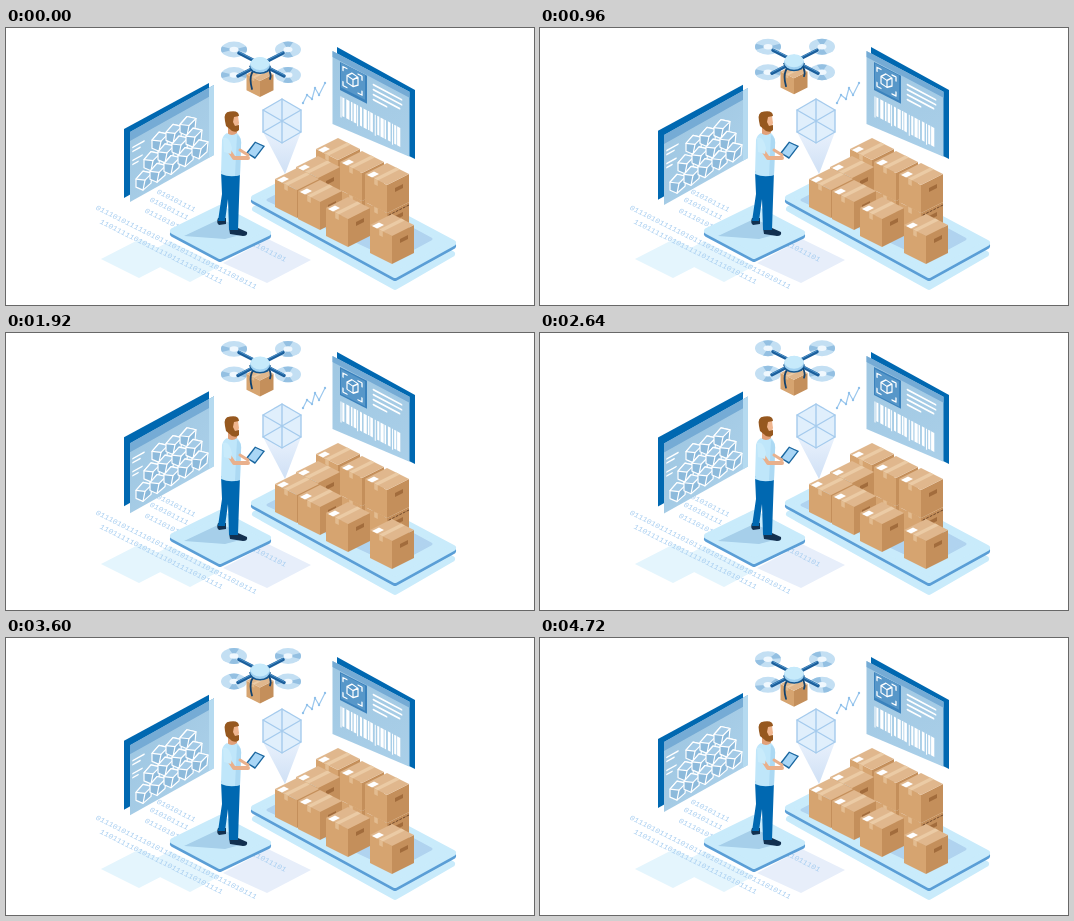
Recreate the animation shown at these times as an HTML page. Size 528 px wide and 277 px high, loop 4800 ms.

```html
<!DOCTYPE html>
<html lang="en">
<head>
<meta charset="utf-8">
<title>Smart warehouse</title>
<style>
html, body { margin: 0; width: 100%; height: 100%; overflow: hidden; background: #fff; }
svg { display: block; width: 528px; height: 277px; }
.code { font: 8px "Liberation Mono", monospace; fill: #a6cdf0; }
</style>
</head>
<body>
<svg viewBox="0 0 528 277" fill="none" stroke-linejoin="round" stroke-linecap="round">
  <defs>
    <linearGradient id="beam" x1="0" y1="0" x2="0" y2="1">
      <stop offset="0" stop-color="#e9f1fc"/><stop offset="1" stop-color="#cfe0f5"/>
    </linearGradient>
    <linearGradient id="glass" x1="0" y1="0" x2="1" y2="1">
      <stop offset="0" stop-color="#9fc7e2"/><stop offset="1" stop-color="#abd0e9"/>
    </linearGradient>
  </defs>

  <!-- ground -->
  <path d="M95 231 134 211 172 230 133 250zM134 229 164 213 214 238 184 254z" fill="#e4f5fd"/>
  <path d="M217 235 262 211 305 232 261 255z" fill="#e7eefa"/>
  <g id="codes" class="code"></g>

  <!-- platforms -->
  <g stroke-width="6">
    <path d="M249 181 306 152 446 226 389 259z" fill="#c9ebfb" stroke="#c9ebfb"/>
    <path d="M248 173 306 144 447 218 389 250z" fill="#5a9ed6" stroke="#5a9ed6"/>
    <path d="M248 170 306 140 447 215 389 247z" fill="#c9ebfb" stroke="#c9ebfb"/>
    <path d="M262 172 308 148 425 211 388 231z" fill="#b0d3ef" stroke="#b0d3ef" stroke-width="3"/>
    <path d="M167 206 214 183 262 208 214 231z" fill="#5a9ed6" stroke="#5a9ed6"/>
    <path d="M167 203 214 180 262 205 214 228z" fill="#c9ebfb" stroke="#c9ebfb"/>
    <path d="M178 208 214 191 224 195 238 206 219 211z" fill="#a6cfea"/>
  </g>

  <!-- left screen -->
  <path id="leftBack" d="M118 101 203 55V122L118 170z" fill="#0068b1"/>
  <g id="leftFront">
    <g transform="matrix(1 -.56 0 1 124 104)">
      <path d="M0 0H84V70H0z" fill="url(#glass)"/>
      <path d="M0 0H84V9H0z" fill="#75abd5"/>
      <path d="M79 0H84V70H79z" fill="#b5daf0"/>
      <path d="M3 17H14M3 21H10M3 30H12M3 34H8" stroke="#fff" stroke-width="1.6"/>
    </g>
    <g id="cells" stroke="#fff" stroke-width="1.2"></g>
  </g>

  <!-- right screen -->
  <path d="M331 19 409 62V131L331 92z" fill="#0068b1"/>
  <g transform="matrix(1 .53 0 1 326.500 23)">
    <path d="M0 0H77V65L0 73z" fill="url(#glass)"/>
    <path d="M0 0H77V6H0z" fill="#75abd5"/>
    <path d="M41 12H69M41 17H69M41 22H67M41 27H54" stroke="#fff" stroke-width="1.8"/>
    <g id="bars" fill="#fff"></g>
  </g>
  <g transform="matrix(1 .51 0 1 334 34)">
    <path d="M0 0H27V28H0z" fill="#3a82bd"/>
    <g id="scan">
      <path d="M1 0H25V25H1z" fill="#5797c9"/>
      <path d="M3 7V3H7M18 3H22V7M22 18V22H18M7 22H3V18" stroke="#fff" stroke-width="1.3"/>
      <path d="M7 10 12 5 18 6V14L13 18 7 17zM7 10 13 11 18 6M13 11V18" stroke="#fff" stroke-width="1.2"/>
    </g>
  </g>

  <!-- hologram -->
  <path d="M257 104 276 116 295 104 279 146z" fill="url(#beam)"/>
  <g stroke="#a5cbed" stroke-width="1.4">
    <path d="M276 71 295 82V104L276 115 257 104V82z" fill="#e0effc"/>
    <path d="M276 71V115M257 82 295 104M295 82 257 104"/>
  </g>
  <path d="M297 75 301 67 306 71 309 60 313 67 319 55" stroke="#9cc8ee" stroke-width="1.2"/>
  <path d="M297 75h0M301 67h0M306 71h0M309 60h0M313 67h0M319 55h0" stroke="#8fc0ea" stroke-width="2.4"/>

  <g id="stack"></g>

  <!-- worker -->
  <path d="M212 190 220 190 220 196 213 197Q210 195 212 190zM223 200 232 200 241 204Q242 208 237 208L224 206z" fill="#12304f"/>
  <path d="M215 143H234L233 172 232 202H223L222 171 219 193H212L216 166z" fill="#0068b1"/>
  <path d="M222 98H231V108H222z" fill="#e2a078"/>
  <path d="M221 105Q226 109 231 105Q236 109 235 118L234 147Q224 150 215 146L216 112Q217 107 221 105z" fill="#bfe6fa"/>
  <path d="M231 107Q236 109 235 118L234 147 229 148z" fill="#acd9f3"/>
  <path d="M222 121 228 130 242 130" stroke="#e9b08c" stroke-width="4"/>
  <path d="M217 110Q223 107 226 120L225 126 218 124z" fill="#c9ebfb"/>
  <path d="M240 125 249 113.500 259 118 249 131z" fill="#17659f"/>
  <path d="M242 125 249.500 115 257 118.500 249 129z" fill="#a9d6f6"/>
  <path d="M234 122 242 127" stroke="#e9b08c" stroke-width="3"/>
  <path d="M222 88H232L233 95 231 102H224z" fill="#f0b68f"/>
  <path d="M219 93Q217 84 224 83.500 233 82 233 88L228 89 227 94 229 98 233 97V102Q231 105 226 103L220 98z" fill="#96581f"/>

  <!-- drone -->
  <g id="drone">
    <g id="rotors"></g>
    <path d="M233 25 278 48M277 25 232 48" stroke="#1b5f9c" stroke-width="3.400"/>
    <path d="M233 24 278 47M277 24 232 47" stroke="#5b9fd4" stroke-width=".8"/>
    <g id="cargo"></g>
    <path d="M249 41Q242 47 246 61M262 41Q266 45 264 51" stroke="#12436f" stroke-width="1.800"/>
    <path d="M243 38Q254 32 265 38L262 44Q254 48 246 44z" fill="#14568e"/>
    <ellipse cx="254" cy="37" rx="10" ry="7.500" fill="#9fd0f0"/>
    <ellipse cx="254" cy="35.500" rx="9.500" ry="6.500" fill="#c6eafb"/>
  </g>
</svg>
<script>
const $ = id => document.getElementById(id);
const LOOP = 4800, STEP = 80;

// Parcel with its nearest bottom corner at x, y.
function parcel(x, y, w = 22, h = 28) {
  const d = w / 2, top = y - h;
  const face = (fill, ...p) => `<path fill="${fill}" d="M${p.join(' ')}z"/>`;
  return face('#d6a470', x, y, x - w, y - d, x - w, top - d, x, top) +
    face('#c48f5b', x, y, x + w, y - d, x + w, top - d, x, top) +
    face('#e0b78d', x, top, x - w, top - d, x, top - w, x + w, top - d) +
    face('#ebcba5', x - w * .58, top - d * .58, x - w * .42, top - d * .42,
      x + w * .58, top - d * 1.42, x + w * .42, top - d * 1.58) +
    face('#e3bc90', x - w * .58, top - d * .58, x - w * .42, top - d * .42,
      x - w * .42, top - d * .42 + h * .2, x - w * .58, top - d * .58 + h * .2);
}

function labels(x, y) {
  const top = y - 28;
  return `<path fill="#fff" d="M${x - 20} ${top - 10}l7-3.500 5 2.500-7 3.500z"/>` +
    `<path fill="#a26c3c" d="M${x + 8} ${top + 3}l8-4v4l-8 4z"/>`;
}

$('stack').innerHTML = [
  [332, 188], [332, 160], [312, 178], [356, 201], [356, 173], [381, 213],
  [381, 185], [291, 190], [314, 202], [342, 219], [386, 236]
].map(([x, y]) => parcel(x, y) + labels(x, y)).join('') +
  '<path d="M383 187 403 177" stroke="#70482a" stroke-width="1" stroke-dasharray="2 2"/>';
$('cargo').innerHTML = parcel(254, 69, 13.5, 16);

// Honeycomb of cubes lying along the left screen.
let cells = '';
[[30, 26, 3], [22, 41, 4], [14, 56, 5]].forEach(([u, v, count]) => {
  for (let i = 0; i < count; i++) {
    const x = 124 + u + i * 14, y = 104 - .56 * (u + i * 14) + v;
    cells += `<g transform="translate(${x} ${y})">
      <path fill="#8dbadb" d="M-8 -1 -1 -9 8 -7 7 3 -1 10 -8 7z"/>
      <path fill="#a3cae6" d="M-8 -1 -1 -9 8 -7 1 0z"/><path d="M1 0 -1 10"/></g>`;
  }
});
$('cells').innerHTML = cells;

let bars = '';
for (let x = 8, i = 0; x < 68; i++) {
  const w = 1 + (i * 7 % 5) * .55;
  bars += `<path d="M${x} 41h${w}v${i % 5 ? 19 : 21}h${-w}z"/>`;
  x += w + .8 + (i * 3 % 4) * .35;
}
$('bars').innerHTML = bars;

// Binary digits laid flat on the ground.
$('codes').innerHTML = [
  [150, 165, 9], [143, 173, 9], [138, 184, 11], [89, 181, 38], [93, 195, 29], [245, 217, 8]
].map(([x, y, n]) => {
  const bits = Array.from({ length: n }, (_, i) => (i * i + i * 3 + x) % 7 < 3 ? 1 : i % 2).join('');
  return `<text transform="matrix(.88 .44 -.5 .75 ${x} ${y})">${bits}</text>`;
}).join('');

const blades = [];
for (const [x, y] of [[228, 21.5], [282, 21.5], [228, 47], [282, 47]]) {
  $('rotors').insertAdjacentHTML('beforeend', `<g transform="translate(${x} ${y}) scale(1 .61)">
    <circle r="13" fill="#c3dff3"/>
    <path d="M0 0 12 -5A13 13 0 0 1 12 5zM0 0 -12 5A13 13 0 0 1 -12 -5z" fill="#94c0e2"/>
    <circle r="4.500" fill="#f0f8fe"/></g>`);
  blades.push($('rotors').lastElementChild.querySelector('path'));
}

const shift = (id, y) => $(id).setAttribute('transform', `translate(0 ${y.toFixed(2)})`);
const swing = (t, peak, end) => t < peak ? t / peak : Math.max(0, (end - t) / (end - peak));

function draw(now) {
  const t = Math.floor(now % LOOP / STEP) * STEP;
  const p = swing(t, 2320, 4560);
  shift('leftBack', 4 * p);
  shift('leftFront', 7.5 * p);
  shift('scan', 2 * swing(t, 2400, LOOP));
  shift('drone', -7 * swing(t, 2400, LOOP));
  blades.forEach((b, i) => b.setAttribute('transform', `rotate(${t * .375 + i * 90})`));
}

const start = performance.now();
function tick() {
  draw(performance.now() - start);
  requestAnimationFrame(tick);
}
tick();
</script>
</body>
</html>
```
